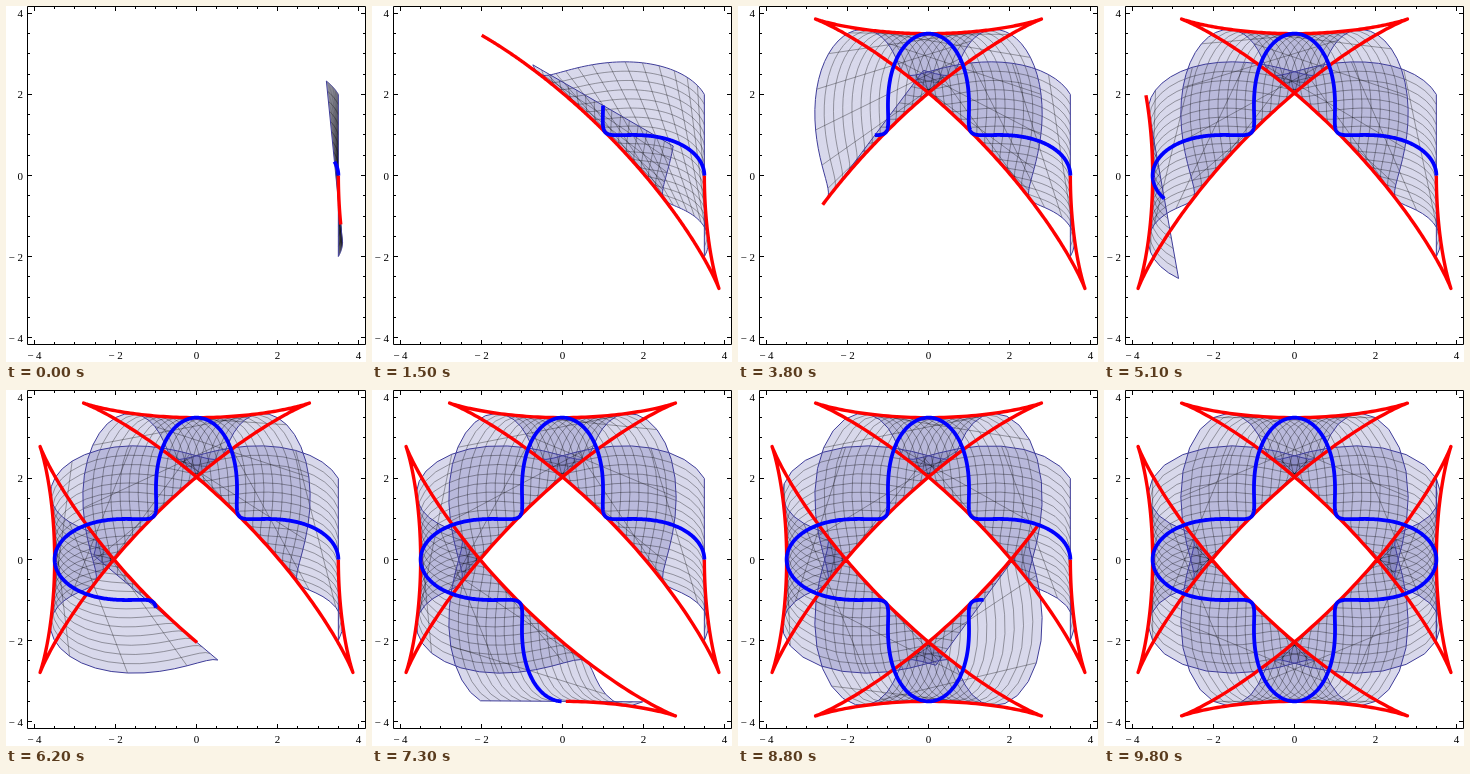
An HTML page with a canvas that plays this animation: 360x356 px, repeating every 9900 ms.

```html
<!DOCTYPE html>
<html lang="en">
<head>
<meta charset="utf-8">
<title>Envelope of perpendicular segments</title>
<style>
  html, body { margin: 0; width: 100%; height: 100%; overflow: hidden; background: #fff; }
  canvas { display: block; }
</style>
</head>
<body>
<canvas id="stage" width="360" height="356"></canvas>
<script>
const ctx = document.getElementById('stage').getContext('2d');
const UNIT = 40.53, CX = 190.5, CY = 169.5;
const BOX = { left: 21.5, top: 0.5, right: 359.5, bottom: 338.5 };
const STEPS = 99, STEP_MS = 100, FIRST = 0.1, TURN = 2 * Math.PI;
const HALF = 2, MESH = 16, STRIPS = 64;

const radius = a => 2.5 + Math.cos(4 * a);
const slope = a => -4 * Math.sin(4 * a);

// Point at signed distance s along the line perpendicular to the radius at angle a.
function point(a, s) {
  const r = radius(a), c = Math.cos(a), d = Math.sin(a);
  return [CX + UNIT * (r * c - s * d), CY - UNIT * (r * d + s * c)];
}

function trace(points) {
  ctx.beginPath();
  for (const [x, y] of points) ctx.lineTo(x, y);
}

function stroke(points, color, width) {
  trace(points);
  ctx.strokeStyle = color;
  ctx.lineWidth = width;
  ctx.stroke();
}

function sweep(end, count, offset) {
  return Array.from({ length: count + 1 }, (_, i) => {
    const a = end * i / count;
    return point(a, offset(a));
  });
}

const rail = (end, s) => sweep(end, STRIPS, () => s);
const rung = a => [point(a, -HALF), point(a, HALF)];

function drawSurface(end) {
  const inner = rail(end, -HALF), outer = rail(end, HALF);
  ctx.fillStyle = 'rgba(63,61,153,0.2)';
  for (let i = 0; i < STRIPS; i++) {
    trace([inner[i], outer[i], outer[i + 1], inner[i + 1]]);
    ctx.fill();
  }
  for (let i = 1; i < MESH; i++) {
    const k = i / MESH;
    stroke(rung(end * k), 'rgba(0,0,0,0.45)', 0.75);
    stroke(rail(end, HALF * (2 * k - 1)), 'rgba(0,0,0,0.45)', 0.75);
  }
  for (const edge of [inner, outer, rung(0), rung(end)]) stroke(edge, 'rgb(63,61,153)', 1);
}

function line(x1, y1, x2, y2) {
  ctx.moveTo(x1, y1);
  ctx.lineTo(x2, y2);
}

function drawFrame() {
  const { left, top, right, bottom } = BOX;
  ctx.beginPath();
  ctx.rect(left, top, right - left, bottom - top);
  for (let v = -4; v <= 4; v += 0.5) {
    const size = v % 2 ? 2.5 : 4.5;
    const x = Math.floor(CX + v * UNIT) + 0.5;
    const y = Math.floor(CY - v * UNIT) + 0.5;
    line(x, top, x, top + size);
    line(x, bottom, x, bottom - size);
    line(left, y, left + size, y);
    line(right, y, right - size, y);
  }
  ctx.strokeStyle = '#000';
  ctx.lineWidth = 1;
  ctx.stroke();

  ctx.fillStyle = '#000';
  ctx.font = '11px "Liberation Serif", Times, serif';
  for (let v = -4; v <= 4; v += 2) {
    const label = v < 0 ? '\u2212 ' + -v : String(v);
    ctx.textAlign = 'center';
    ctx.fillText(label, CX + v * UNIT, 353);
    ctx.textAlign = 'right';
    ctx.fillText(label, 17, CY - v * UNIT + 4);
  }
}

function draw(ms) {
  const step = Math.floor(ms / STEP_MS) % STEPS;
  const end = FIRST + (TURN - FIRST) * step / (STEPS - 1);
  ctx.fillStyle = '#fff';
  ctx.fillRect(0, 0, 360, 356);
  ctx.lineJoin = 'round';
  drawSurface(end);
  stroke(sweep(end, 600, slope), '#f00', 3.4);
  stroke(sweep(end, 600, () => 0), '#00f', 3.8);
  ctx.lineJoin = 'miter';
  drawFrame();
}

const start = performance.now();
function tick() {
  draw(performance.now() - start);
  requestAnimationFrame(tick);
}
tick();
</script>
</body>
</html>
```
